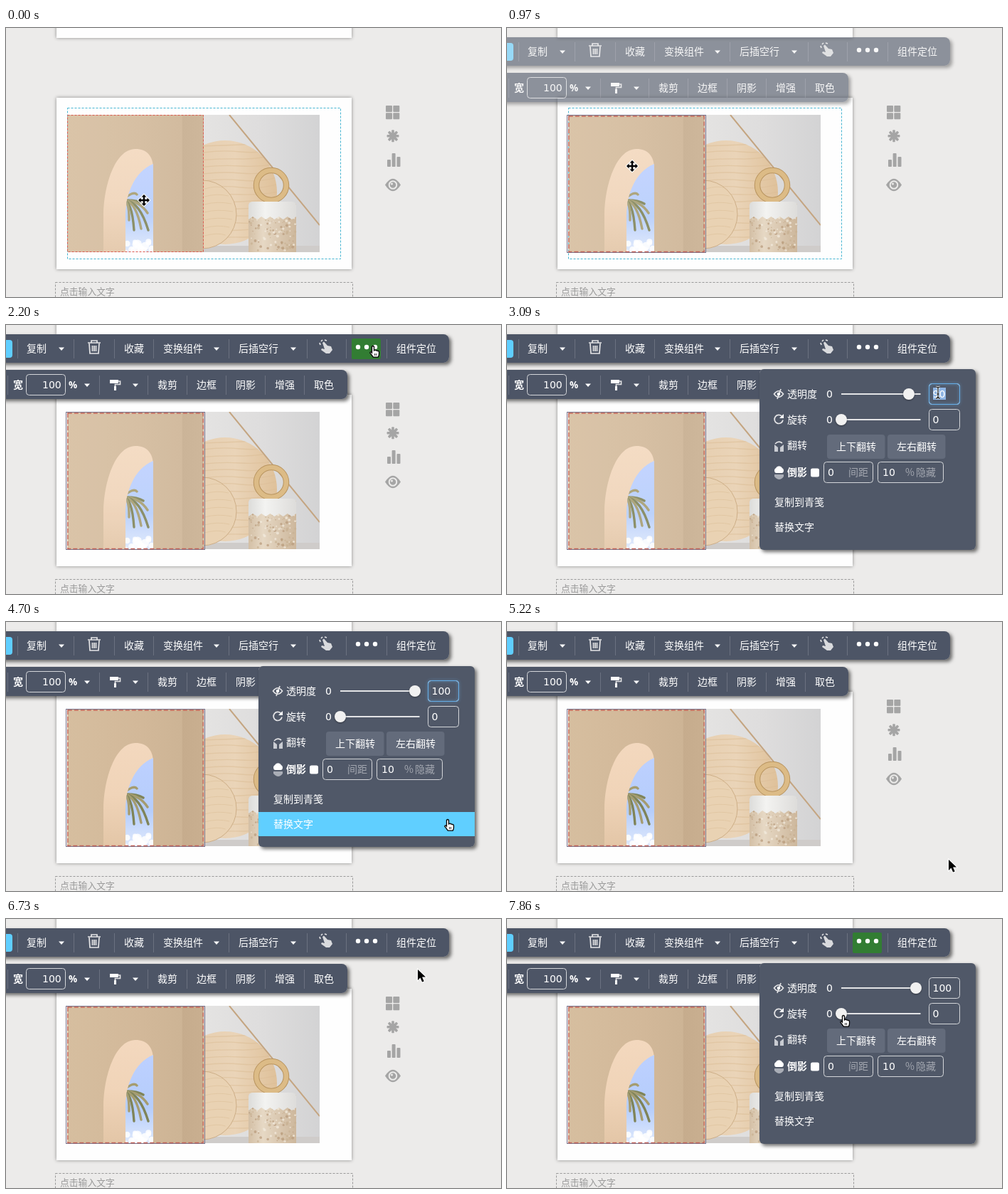
An HTML page that plays this animation: 696 by 378 pixels, repeating every 8 s.

```html
<!DOCTYPE html>
<html lang="zh">
<head>
<meta charset="utf-8">
<title>图片透明度</title>
<style>
html, body { margin: 0; width: 100%; height: 100%; overflow: hidden; background: #ecebea; }
svg { display: block; width: 696px; height: 378px; }
text { font: 14px "Noto Sans CJK SC", "Noto Sans CJK", sans-serif; fill: #fff; white-space: pre; }
.num { font-family: "DejaVu Sans", sans-serif; }
.bold { font-weight: 700; }
.dim { fill: #a3a7b0; }
.card { fill: #fefefe; filter: drop-shadow(0 0 2.5px rgba(0,0,0,.42)); }
.bar { fill: #4d5566; filter: drop-shadow(.8px .8px 0 #ccc) drop-shadow(3px 3px 2.5px rgba(0,0,0,.55)); }
.field { fill: none; stroke: #d4d6da; }
.line { fill: none; stroke: #e4e4e6; stroke-width: 1.7; }
.knob { fill: #f1f1f1; filter: drop-shadow(0 1px 1px rgba(0,0,0,.4)); }
.glow { fill: none; stroke: #66afe9; filter: drop-shadow(0 0 2px #66afe9); }
.side { fill: #a5a5a5; }
</style>
</head>
<body>
<svg id="stage" viewBox="0 0 696 378"></svg>
<script>
const LOOP = 8000;
const stage = document.getElementById('stage');

let seed = 7;
const rnd = () => (seed = seed * 16807 % 2147483647) / 2147483647;
const many = (n, fn) => Array.from({ length: n }, (_, i) => fn(i)).join('');

const rect = (x, y, w, h, attrs = '') => `<rect x="${x}" y="${y}" width="${w}" height="${h}" ${attrs}/>`;
const circle = (x, y, r, attrs = '') => `<circle cx="${x}" cy="${y}" r="${r}" ${attrs}/>`;
const path = (d, attrs = '') => `<path d="${d}" ${attrs}/>`;
const label = (x, cy, s, cls = '') => `<text x="${x}" y="${cy + 5}" class="${cls}">${s}</text>`;
const caret = (x, y) => path(`M${x - 4} ${y - 2}h8l-4 4.5z`, 'fill="#fff"');
const seps = (y, ...xs) => xs.map(x => rect(x, y, 1, 27, 'fill="#6b7180"')).join('');
const field = (x, y, w) => rect(x + .5, y + .5, w - 1, 29, 'rx="4" class="field"');
const gradient = (id, dir, ...stops) => `<linearGradient id="${id}" ${dir === 'v' ? 'x2="0" y2="1"' : ''}>` +
  stops.map(([o, c]) => `<stop offset="${o}" stop-color="${c}"/>`).join('') + '</linearGradient>';

const sky = 'M168 315V264C168 234 180 202 207 191V315Z';

const defs = `<defs>
  ${gradient('wall', 'h', [0, '#d6be9f'], [.55, '#d2b899'], [.84, '#cdb495'], [.845, '#c6ac8d'], [1, '#c9af90'])}
  ${gradient('niche', 'v', [0, '#f3d8be'], [.5, '#f0d4b8'], [1, '#e3c6a7'])}
  ${gradient('air', 'v', [0, '#bdd0ff'], [.6, '#b5cdfb'], [1, '#dfe9fc'])}
  ${gradient('studio', 'h', [0, '#e4e3e2'], [.5, '#dedddd'], [1, '#d3d3d4'])}
  ${gradient('wood', 'h', [0, '#e4cbab'], [.6, '#ead4b8'], [1, '#dfc19a'])}
  ${gradient('stone', 'h', [0, '#d3bfa5'], [.3, '#e6d8c4'], [1, '#cdb79c'])}
  ${gradient('plaster', 'h', [0, '#dcdcda'], [.35, '#f3f3f1'], [1, '#dddcda'])}
  <clipPath id="skyClip">${path(sky)}</clipPath>
  <clipPath id="rightClip">${rect(278, 122, 163, 193)}</clipPath>
  <clipPath id="discClip">${circle(308, 231, 73)}</clipPath>
</defs>`;

const fronds = [[184, 234], [193, 247], [199, 260], [200, 284], [190, 282], [180, 284], [173, 270]];
const archPhoto = `<g id="arch">
  ${rect(86, 122, 192, 193, 'fill="url(#wall)"')}
  ${path('M137 315V262C137 225 152 170 182 170C198 170 207 180 207 198V315Z', 'fill="url(#niche)"')}
  ${path(sky, 'fill="url(#air)"')}
  <g clip-path="url(#skyClip)">
    ${many(16, () => circle(168 + rnd() * 40, 298 + rnd() * 18, 2 + rnd() * 4, 'fill="#fff" opacity=".85"'))}
    ${fronds.map(([x, y], i) => path(`M164 242Q${(164 + x) / 2 + 5} ${Math.min(y, 247) - 6} ${x} ${y}`,
      `fill="none" stroke="${i % 2 ? '#7f8459' : '#a59c70'}" stroke-width="3.4" stroke-linecap="round"`)).join('')}
  </g></g>`;

const studioPhoto = `<g clip-path="url(#rightClip)">
  ${rect(278, 122, 163, 193, 'fill="url(#studio)"')}
  ${rect(278, 306, 163, 9, 'fill="#cfccca"')}
  ${circle(308, 231, 73, 'fill="url(#wood)"')}
  <g clip-path="url(#discClip)" fill="none" stroke="#dbbd96" stroke-width="1.3" opacity=".55">
    ${many(14, i => path(`M270 ${166 + i * 10}q30 ${-8 + rnd() * 8} 60 -2t60 ${-4 - rnd() * 6}`))}
  </g>
  ${circle(276, 262, 48, 'fill="#e9d2b3" stroke="#cdae87"')}
  ${many(7, i => path(`M279 ${226 + i * 11}q18 -5 ${28 + 12 * Math.sin(i / 2)} -1`, 'fill="none" stroke="#dcc09a" opacity=".6"'))}
  ${path('M314 122L441 277', 'stroke="#c4a581" stroke-width="2"')}
  ${circle(373, 221, 21, 'fill="none" stroke="#b99560" stroke-width="8.5"')}
  ${circle(373, 221, 21, 'fill="none" stroke="#dcbb86" stroke-width="6.5"')}
  ${rect(341, 247, 67, 68, 'fill="url(#stone)"')}
  ${many(110, () => circle(342 + rnd() * 65, 266 + rnd() * 48, .5 + rnd() * 1.6,
    `fill="${['#b99c7d', '#f1e9dc', '#c8b193'][Math.floor(rnd() * 3)]}" opacity=".75"`))}
  ${path('M341 249q0-4 5-5h57q5 1 5 5v16' + many(11, i => `l-6.1 ${i % 2 ? -4 : 4}`) + 'z', 'fill="url(#plaster)"')}
</g>`;

const sideIcons = `<g class="side">
  ${many(4, i => rect(534 + i % 2 * 10.3, 109 + (i >> 1) * 10.3, 9, 9, 'rx="1"'))}
  ${many(4, i => rect(535.5, 150, 17, 3.6, `rx="1" transform="rotate(${i * 45} 544 151.8)"`))}
  ${rect(536, 185, 5, 10, 'rx="1"')}${rect(542.6, 176, 5, 19, 'rx="1"')}${rect(549.5, 181, 5, 14, 'rx="1"')}
  ${path('M533 220.500Q544 203 555 220.500Q544 238 533 220.500Z')}
  ${circle(544, 220.500, 5.300, 'fill="none" stroke="#ecebea" stroke-width="2"')}
  ${circle(542.500, 219, 1.500, 'fill="#ecebea"')}
</g>`;

const page = `
  ${rect(71, -20, 415, 34, 'class="card"')}
  ${rect(71, 98, 415, 241, 'class="card"')}
  ${rect(69.5, 357.5, 418, 40, 'fill="none" stroke="#999" stroke-dasharray="3 2"')}
  <text x="76" y="375" style="font-size:12.8px;fill:#999">点击输入文字</text>
  ${archPhoto}${studioPhoto}${sideIcons}
  ${rect(86.5, 112.5, 384, 212, 'id="box" fill="none" stroke="#45b5d2" stroke-dasharray="3 2"')}
  ${rect(86.5, 122.5, 191, 192, 'id="hover" fill="none" stroke="#dc5a50" stroke-dasharray="3 2"')}
  <g id="picked" fill="none">
    ${rect(84.5, 122.5, 195, 193, 'stroke="#77718a"')}
    ${rect(86.8, 124, 190.500, 190.500, 'stroke="#c4665b" stroke-width="1.5" stroke-dasharray="6 3"')}
  </g>`;

const bars = `<g id="bars">
  ${rect(-20, 13, 643, 40, 'rx="8" class="bar"')}
  ${rect(-10, 21, 19, 25, 'rx="4" fill="#5fceff"')}
  ${seps(20, 16, 95, 152, 207, 313, 423, 478, 535)}
  ${label(29, 33, '复制')}${caret(78, 33.5)}
  ${path('M115 25h18M120 25v-3h8v3M117 26l1 14h12l1-14M121.500 29v8M124 29v8M126.500 29v8', 'class="line"')}
  ${label(166, 33, '收藏')}${label(221, 33, '变换组件')}${caret(296, 33.5)}
  ${label(327, 33, '后插空行')}${caret(404, 33.5)}
  ${path('M445 25l2-1.500 5 5.500 5 1 2 5-4 5h-5l-7-5 1-2 4 1z', 'fill="#d9dadd"')}
  ${path('M442 28l-1-3M443 23l2-2M448 21l3 1', 'class="line"')}
  ${rect(486, 19, 41, 29, 'id="green" rx="2" fill="#327d33"')}
  ${[495, 507, 519].map(x => circle(x, 31, 3.2, 'fill="#fff"')).join('')}
  ${label(549, 33, '组件定位')}
  ${rect(-20, 63, 500, 41, 'rx="8" class="bar"')}
  ${seps(71, 2, 131, 199, 254, 309, 364, 419)}
  ${label(10, 84, '宽', 'bold')}${field(28, 69, 56)}${label(51, 84, '100', 'num')}
  <text x="88" y="89" style="font:700 13.500px 'Noto Sans',sans-serif">%</text>${caret(114, 84.5)}
  ${path('M146 77h12v5h-12zM152 86h3v6h-3z', 'fill="#fff"')}
  ${path('M158 79h2.500v4.500h-7v3', 'class="line"')}${caret(182, 84.5)}
  ${['裁剪', '边框', '阴影', '增强', '取色'].map((s, i) => label(213 + i * 55, 84, s)).join('')}
</g>`;

const slider = y => rect(470, y - 1, 111.5, 2, 'fill="#e3e4e6"');
const panel = `<g id="panel">
  ${rect(355, 62, 304, 254, 'rx="6" class="bar" fill-opacity=".97"')}
  ${path('M375.500 97q6.500-8.500 13 0q-6.500 8.500-13 0zM385 90l-5 14', 'class="line"')}${circle(382, 97, 2.300, 'fill="#fff"')}
  ${label(394, 97, '透明度')}${label(449, 97, '0', 'num')}${slider(97)}
  ${circle(0, 97, 8, 'id="knob" class="knob"')}
  ${field(593, 82, 44)}${rect(593.5, 82.5, 43, 29, 'id="focus" rx="4" class="glow"')}
  ${rect(599, 88, 18, 17, 'id="mark" fill="#8eb4e3"')}
  <g id="old">${label(598.5, 97, '90', 'num')}</g>
  ${[...'100'].map((c, i) => `<g id="d${i}">${label(598.5 + i * 8.9, 97, c, 'num')}</g>`).join('')}
  ${path('M387 129a6 6 0 1 0 1 4.500', 'class="line"')}${path('M389 125v6h-6z', 'fill="#fff"')}
  ${label(394, 133, '旋转')}${label(449, 133, '0', 'num')}${slider(133)}${circle(470, 133, 8, 'class="knob"')}
  ${field(593, 118, 44)}${label(598.5, 133, '0', 'num')}
  ${path('M376 168l5 4v6h-5zM389 168l-5 4v6h5z', 'fill="#c9ccd2"')}${path('M377 167q5-5 10-1', 'class="line"')}
  ${label(394, 169, '翻转')}
  ${rect(450, 154, 81.5, 34, 'rx="4" fill="#636b7b"')}${label(463, 171, '上下翻转')}
  ${rect(535, 154, 81.5, 34, 'rx="4" fill="#636b7b"')}${label(548, 171, '左右翻转')}
  ${path('M378 208a4 4 0 0 1 0-7 5 5 0 0 1 9 0 4 4 0 0 1 0 7z', 'fill="#fff"')}
  ${path('M376 210h13v3q-6 8-13 0z', 'fill="#a9adb6"')}
  ${label(394, 207, '倒影', 'bold')}${rect(427, 201.5, 12, 12, 'rx="2.500" fill="#fff"')}
  ${field(445, 192, 70)}${label(451, 207, '0', 'num')}${label(480, 207, '间距', 'dim')}
  ${field(521, 192, 93)}${label(528, 207, '10', 'num')}${label(560, 207, '%', 'dim')}${label(575, 207, '隐藏', 'dim')}
  ${rect(355, 267, 304, 34, 'id="row" fill="#60cfff"')}
  ${label(376, 249, '复制到青笺')}${label(376, 284, '替换文字')}
</g>`;

const ink = 'fill="#000" stroke="#fff" stroke-width="2" paint-order="stroke"';
const beam = 'M-3-8q3 0 3 2v12q0 2-3 2M3-8q-3 0-3 2v12q0 2 3 2M-1.500 2h3';
const pointer = `<g id="pointer">
  <g id="move">${path('M0-8l3.5 3.5h-2.3v3.3h3.3v-2.3L8 0l-3.5 3.5v-2.3h-3.3v3.3h2.3L0 8l-3.5-3.5h2.3v-3.3h-3.3v2.3L-8 0l3.5-3.5v2.3h3.3v-3.3h-2.3z', ink)}</g>
  <g id="arrow">${path('M0 0v15l3.5-3.4 2.6 6 2.6-1.2-2.6-5.8h4.9z', ink)}</g>
  <g id="hand">${path('M-1.5 1.5q1.5-2 3 0v5.5l1-.5q1.2-.8 2 .5 1.2-.6 2 .6 2-.5 2 1.5v3q0 2-1.2 4h-7q-2-3-4.5-6 .5-2.5 2.7 0z', 'fill="#fff" stroke="#000" stroke-width="1.3"')}
    ${path('M2.500 11v3M4.500 11v3', 'stroke="#000" stroke-width=".8"')}</g>
  <g id="beam" fill="none">${path(beam, 'stroke="#fff" stroke-width="2.600"')}${path(beam, 'stroke="#000" stroke-width="1.100"')}</g>
</g>`;

stage.innerHTML = defs + page + bars + panel + pointer;

// Each step [time, value] holds until the next one.
function hold(id, prop, steps) {
  const frames = steps.map(([t, v]) => ({ offset: t / LOOP, [prop]: v, easing: 'step-end' }));
  frames.push({ offset: 1, [prop]: steps[steps.length - 1][1] });
  document.getElementById(id).animate(frames, { duration: LOOP, iterations: Infinity });
}
const fade = (id, ...steps) => hold(id, 'opacity', steps);

fade('arch', [0, .9], [4250, 1]);
fade('box', [0, 1], [1416, 0], [6110, 1], [6646, 0]);
fade('hover', [0, 1], [970, 0], [6200, 1], [6560, 0]);
fade('picked', [0, 0], [970, 1], [5580, 0], [6560, 1]);
fade('bars', [0, 0], [970, .6], [1060, 1], [5580, 0], [6560, .6], [6646, 1]);
fade('green', [0, 0], [2030, .5], [2117, 1], [3000, .5], [3090, 0], [7075, .5], [7160, 1]);
fade('panel', [0, 0], [2378, .25], [2465, .5], [2552, .75], [2640, 1],
  [5045, .6], [5132, .25], [5220, 0], [7520, .4], [7605, .8], [7690, 1]);
fade('row', [0, 0], [4695, 1], [4782, .4], [4870, 0]);
fade('focus', [0, 0], [3090, 1], [5220, 0]);
fade('mark', [0, 0], [3090, 1], [3450, 0]);
fade('old', [0, 1], [3450, 0]);
[3450, 3810, 3980].forEach((t, i) => fade('d' + i, [0, 0], [t, 1]));
hold('knob', 'transform', [[0, 'translate(565px)'], [4250, 'translate(575px)']]);

const track = [
  [0, 'move', 194, 242], [350, 'move', 188, 226], [440, 'move', 181, 209], [530, 'move', 176, 194],
  [1330, 'move', 260, 185], [1416, 'arrow', 430, 150], [1502, 'arrow', 540, 112],
  [1588, 'arrow', 563, 78], [1674, 'hand', 548, 44], [1760, 'hand', 516, 29],
  [2910, 'hand', 538, 48], [3000, 'arrow', 582, 80], [3090, 'beam', 606, 95], [3450, 'none', 606, 95],
  [4520, 'beam', 613, 105], [4607, 'arrow', 622, 190], [4695, 'hand', 621, 277],
  [4782, 'arrow', 621, 318], [4870, 'arrow', 621, 334],
  [5930, 'arrow', 560, 318], [6020, 'arrow', 470, 290], [6110, 'move', 370, 262],
  [6200, 'move', 270, 235], [6290, 'move', 240, 220],
  [6646, 'arrow', 440, 150], [6730, 'arrow', 579, 71], [6817, 'arrow', 568, 56],
  [6903, 'hand', 548, 44], [6990, 'hand', 530, 36], [7075, 'hand', 516, 29],
  [7690, 'hand', 505, 62], [7775, 'arrow', 486, 105], [7860, 'hand', 473, 135]
];
hold('pointer', 'transform', track.map(([t, , x, y]) => [t, `translate(${x}px, ${y}px)`]));
for (const kind of ['move', 'arrow', 'hand', 'beam']) {
  fade(kind, ...track.map(([t, k]) => [t, k === kind ? 1 : 0]));
}
</script>
</body>
</html>
```
